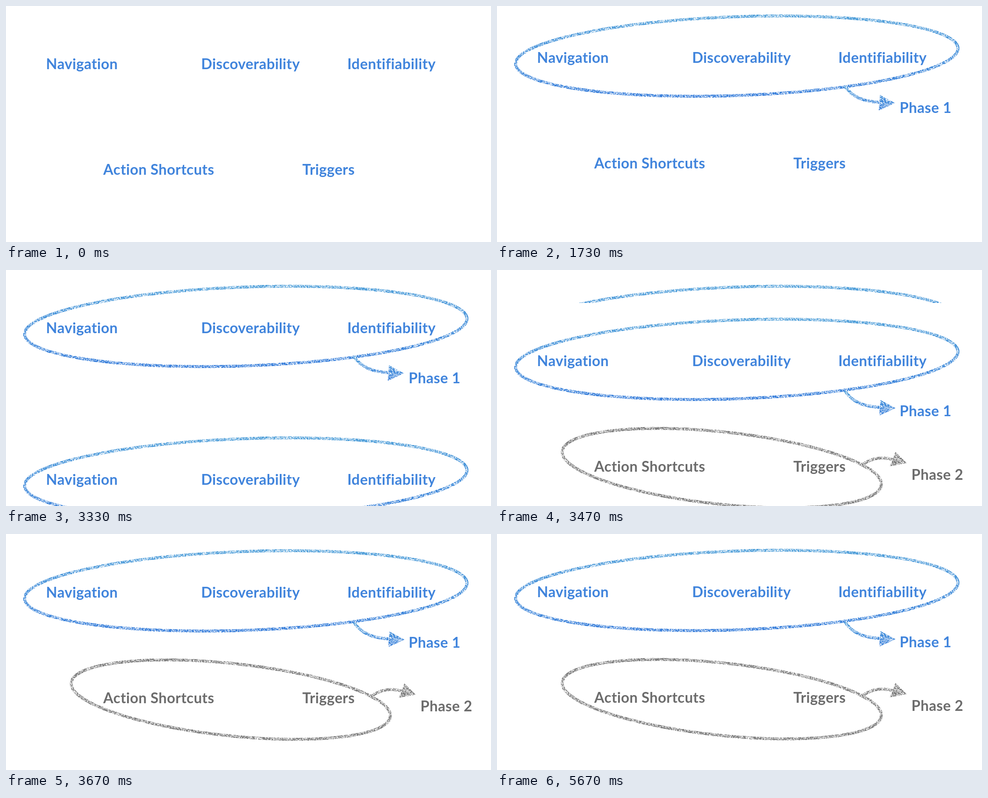
An HTML page with a canvas that plays this animation: 1070 by 523 pixels, repeating every 5.99 s.

```html
<!DOCTYPE html>
<html lang="en">
<head>
<meta charset="utf-8">
<title>Phases</title>
<style>
  html, body { margin: 0; height: 100%; overflow: hidden; background: #fff; }
  canvas { display: block; width: 100vw; height: 100vh; }
</style>
</head>
<body>
<canvas id="stage" width="1070" height="523"></canvas>
<script>
const W = 1070, H = 523, LOOP = 5990, STEP = 1000 / 15;
const BLUE = '#4084dc', GREY = '#6c6c6c', GREY_CHALK = '#7c7c7c';
const stage = document.getElementById('stage').getContext('2d');

function layer(w, h) {
  const canvas = document.createElement('canvas');
  canvas.width = w;
  canvas.height = h;
  return canvas.getContext('2d');
}

let seed = 7;
function random() {
  seed = (seed * 1664525 + 1013904223) % 4294967296;
  return seed / 4294967296;
}

// Tile of small specks, used to rub holes into the chalk lines.
const specks = layer(256, 256);
for (let i = 0; i < 18500; i++) {
  specks.fillRect(random() * 256, random() * 256, 0.8 + random(), 0.8 + random());
}

function label(ctx, text, centre, baseline, color) {
  ctx.font = '700 32px Lato, sans-serif';
  ctx.letterSpacing = '0.4px';
  ctx.textAlign = 'center';
  ctx.fillStyle = color;
  ctx.fillText(text, centre, baseline);
}

function gradient(ctx, top, bottom) {
  const g = ctx.createLinearGradient(0, top, 0, bottom);
  g.addColorStop(0, '#4f9fd9');
  g.addColorStop(1, '#357cda');
  return g;
}

// Tilted ellipse given by its half extents and the lean between both axes.
function oval(ctx, cx, cy, rx, ry, lean, color) {
  ctx.beginPath();
  for (let i = 0; i < 240; i++) {
    const a = i / 240 * 2 * Math.PI;
    ctx.lineTo(cx + rx * Math.cos(a), cy + ry * Math.sin(a + lean));
  }
  ctx.closePath();
  ctx.strokeStyle = color;
  ctx.stroke();
}

function arrow(ctx, tail, head, color) {
  ctx.strokeStyle = ctx.fillStyle = color;
  ctx.stroke(new Path2D(tail));
  ctx.fill(new Path2D(head));
}

function chalk(target, draw) {
  const ctx = layer(W, H);
  ctx.lineWidth = 6.5;
  draw(ctx);
  ctx.globalCompositeOperation = 'destination-out';
  ctx.fillStyle = ctx.createPattern(specks.canvas, 'repeat');
  ctx.setTransform(1, 0, 0, 1, 0, 0);
  ctx.fillRect(0, 0, W, H);
  target.drawImage(ctx.canvas, 0, 0);
}

function phaseOne(slide, dx, dy) {
  chalk(slide, ctx => {
    oval(ctx, 529, 125, 488, 89, -0.192, gradient(ctx, 36, 214));
    ctx.translate(dx, dy);
    arrow(ctx, 'M768 195Q790 230 847 231.5', 'M846 215L879 233L843 250Z', gradient(ctx, 190, 250));
  });
  label(slide, 'Phase 1', 945.5, 250.5, BLUE);
}

function phaseTwo(slide) {
  chalk(slide, ctx => {
    oval(ctx, 496, 366, 352, 88, 0.415, GREY_CHALK);
    arrow(ctx, 'M807 358Q835 337 874 347', 'M879 330L904 355L867 362Z', GREY_CHALK);
  });
  label(slide, 'Phase 2', 971.5, 392, GREY);
}

function makeSlide(lowerColor, decorate) {
  const slide = layer(W, H);
  slide.fillStyle = '#fff';
  slide.fillRect(0, 0, W, H);
  decorate(slide);
  label(slide, 'Navigation', 167.5, 140, BLUE);
  label(slide, 'Discoverability', 539.5, 140, BLUE);
  label(slide, 'Identifiability', 850.5, 140, BLUE);
  label(slide, 'Action Shortcuts', 337, 374, lowerColor);
  label(slide, 'Triggers', 711.5, 374, lowerColor);
  return slide.canvas;
}

// Each slide covers the one before it, entering from the given side.
const slides = [
  { image: makeSlide(BLUE, () => {}), start: -1000, side: 0 },
  { image: makeSlide(BLUE, s => phaseOne(s, -1, -4)), start: 1454, side: -1 },
  { image: makeSlide(GREY, s => { phaseOne(s, 0, 0); phaseTwo(s); }), start: 3284, side: 1 }
];
const MOVE = 470;

function render(now) {
  const t = Math.floor((now % LOOP + 4) / STEP) * STEP;
  for (const { image, start, side } of slides) {
    if (t < start) break;
    const left = Math.max(0, 1 - (t - start) / MOVE) ** 4;
    stage.drawImage(image, 0, Math.round(side * H * left));
  }
}

const begin = performance.now();
function tick() {
  render(performance.now() - begin);
  requestAnimationFrame(tick);
}
tick();
</script>
</body>
</html>
```
